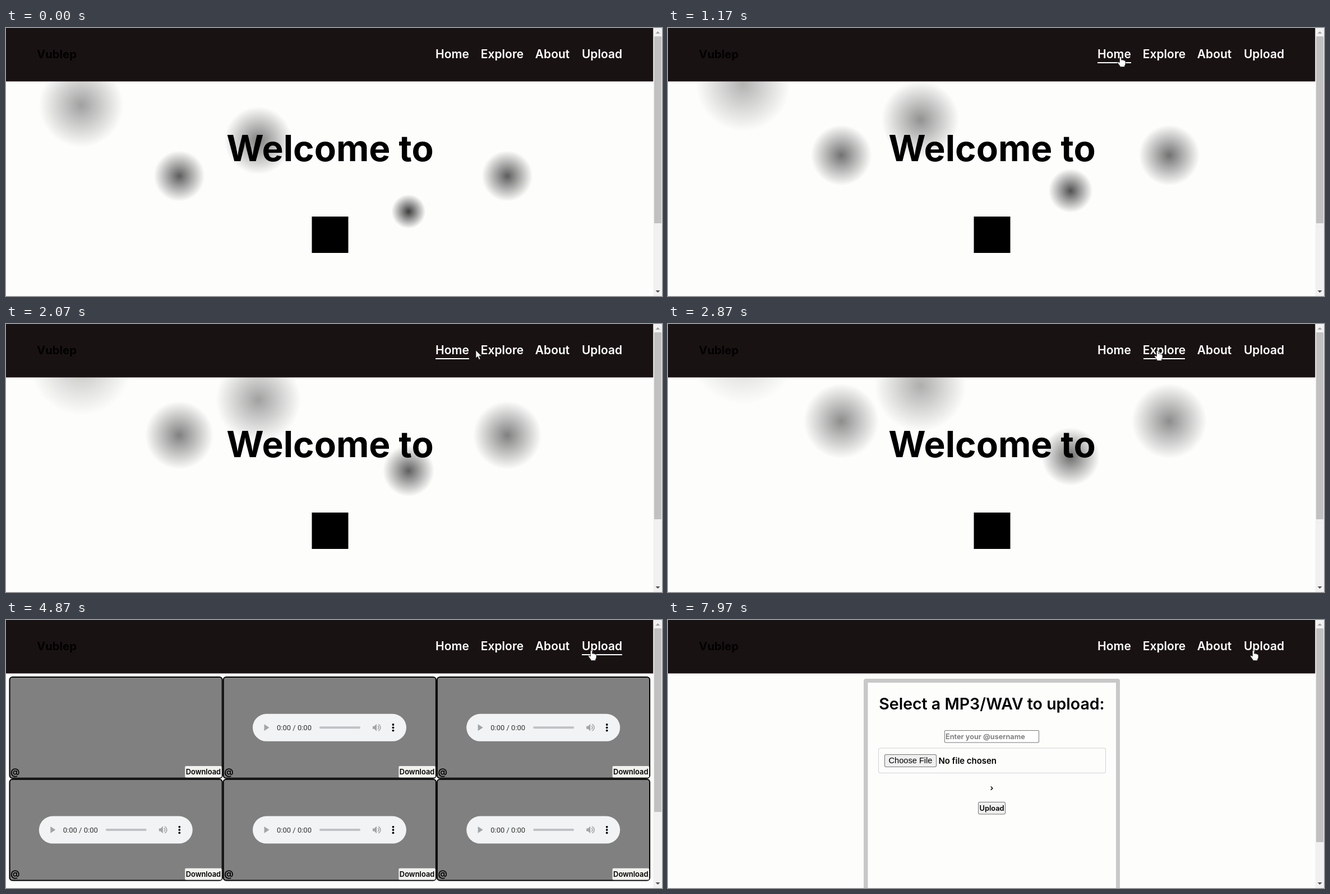
These frames come from a looping animation (1170x479 px, 8 s). An HTML page with a canvas:

```html
<!DOCTYPE html>
<html lang="en">
<head>
<meta charset="utf-8">
<title>Audio sharing site</title>
<style>
  html, body { margin: 0; width: 100%; height: 100%; overflow: hidden; background: #fdfdfc; }
  canvas { display: block; }
</style>
</head>
<body>
<canvas id="stage" width="1170" height="479"></canvas>
<script>
const ctx = document.getElementById('stage').getContext('2d');
const LOOP = 8000, EXPLORE_AT = 3100, UPLOAD_AT = 6720;
const PAPER = '#fdfdfc', SANS = 'Inter, "Open Sans", sans-serif';

// label, left, right
const NAV = [['Home', 766, 826], ['Explore', 848, 922], ['About', 944, 1005], ['Upload', 1027, 1099]];

// x, head start in seconds
const BLOBS = [[134, 6], [450, 4], [309, 2], [894, 2], [718, 0]];

// time, x, y of the pointer tip
const PATH = [
  [700, 1162, -20], [860, 1148, 4], [1150, 807, 51], [1750, 808, 51],
  [2070, 838, 47], [2600, 871, 48], [2870, 873, 47], [3400, 873, 47],
  [3730, 969, 95], [4180, 1094, 424], [4850, 1044, 54], [8000, 1044, 54]
];

// start, end of hand pointer, end of underline, nav item
const HOVERS = [[1060, 2000, 2190, 0], [2190, 3400, EXPLORE_AT, 1], [4780, LOOP, UPLOAD_AT, 3]];

function rect(x, y, w, h, fill, r = 0) {
  ctx.fillStyle = fill;
  ctx.beginPath();
  ctx.roundRect(x, y, w, h, r);
  ctx.fill();
}

function frame(x, y, w, h, fill, line, r) {
  rect(x, y, w, h, line, r);
  rect(x + 1, y + 1, w - 2, h - 2, fill, Math.max(0, r - 1));
}

function text(str, x, y, size, weight, color = '#000', align = 'left', family = SANS) {
  ctx.font = `${weight} ${size}px ${family}`;
  ctx.fillStyle = color;
  ctx.textAlign = align;
  ctx.fillText(str, x, y);
}

function poly(points, fill) {
  ctx.fillStyle = fill;
  ctx.beginPath();
  points.forEach(([x, y]) => ctx.lineTo(x, y));
  ctx.closePath();
  ctx.fill();
}

function dot(x, y, r, fill) {
  ctx.fillStyle = fill;
  ctx.beginPath();
  ctx.arc(x, y, r, 0, Math.PI * 2);
  ctx.fill();
}

// Every blob rises, grows and fades by the same rule
function blob(x, age) {
  const y = 328 - 31.7 * age, r = 30.5 + 7.5 * age, alpha = .76 - .065 * age;
  const g = ctx.createRadialGradient(x, y, 0, x, y, r);
  g.addColorStop(0, `rgba(0,0,0,${alpha})`);
  g.addColorStop(1, 'rgba(0,0,0,0)');
  dot(x, y, r, g);
}

function home(t) {
  BLOBS.forEach(([x, lead]) => blob(x, lead + t / 1000));
  text('Welcome to', 578, 238, 64, 700, '#000', 'center');
  rect(545.5, 337, 65, 65, '#000');
}

function player(x, y) {
  const gray = '#a3a4a5', mid = y + 24.5;
  rect(x, y, 274, 49, '#f1f3f4', 24.5);
  poly([[x + 20.5, mid - 6], [x + 29.5, mid], [x + 20.5, mid + 6]], gray);
  text('0:00 / 0:00', x + 43, y + 29, 13, 400, '#333', 'left', 'Roboto, sans-serif');
  rect(x + 119, mid - 2, 73, 4, '#c0c1c5', 2);
  const sx = x + 214;
  poly([[sx, mid - 2.5], [sx + 3, mid - 2.5], [sx + 7, mid - 6.5],
        [sx + 7, mid + 6.5], [sx + 3, mid + 2.5], [sx, mid + 2.5]], gray);
  ctx.strokeStyle = gray;
  ctx.lineWidth = 1.6;
  [3, 6.2].forEach(r => {
    ctx.beginPath();
    ctx.arc(sx + 7.8, mid, r, -1.2, 1.2);
    ctx.stroke();
  });
  [-5.3, 0, 5.3].forEach(d => dot(x + 250.5, mid + d, 1.9, '#000'));
}

function explore() {
  const w = 381.2, h = 182.8;
  for (let i = 0; i < 6; i++) {
    const x = 5.5 + w * (i % 3), y = 101 + h * Math.floor(i / 3);
    rect(x, y, w, h, '#000', 6);
    rect(x + 2, y + 2, w - 4, h - 4, '#808080', 4);
    if (i) player(x + 53.3, y + 66.8);
    text('@', x + 2.5, y + 175.5, 16.5, 600);
    rect(x + w - 67.5, y + 160, 65.5, 20.6, '#f1f1ee', 2);
    text('Download', x + w - 34.8, y + 174.8, 12.9, 600, '#000', 'center');
  }
}

function upload() {
  rect(349, 105, 457, 400, '#c8c8c8', 4);
  rect(356.5, 112, 442.5, 400, PAPER);
  text('Select a MP3/WAV to upload:', 577.5, 160, 28.5, 600, '#000', 'center');
  frame(493, 197, 169, 22.5, '#fff', '#767676', 2);
  text('Enter your @username', 495, 213, 12.8, 600, '#757575');
  frame(375, 228.5, 406, 45.5, PAPER, '#d2d2d6', 4);
  frame(386, 240, 93, 23, '#efefef', '#767676', 3);
  text('Choose File', 432.5, 256, 14.6, 400, '#000', 'center', '"Liberation Sans", Arial, sans-serif');
  text('No file chosen', 482.5, 256.5, 14.9, 600);
  text('›', 577.5, 304.5, 14, 600, '#000', 'center');
  frame(553, 325, 49, 22.5, '#efefef', '#767676', 3);
  text('Upload', 577.5, 341, 12.8, 600, '#000', 'center');
}

function header(t) {
  rect(0, 0, 1154.5, 95.5, '#191212');
  text('Vublep', 55, 54, 20.3, 700);
  NAV.forEach(([label, left, right]) => text(label, (left + right) / 2, 54, 21, 600, '#fff', 'center'));
  const hover = HOVERS.find(([from, , to]) => t >= from && t < to);
  if (hover) {
    const [, left, right] = NAV[hover[3]];
    rect(left, 61, right - left, 2, '#fff');
  }
}

function scrollbar(end) {
  rect(1154.5, 0, 15.5, 479, '#f1f1f1');
  rect(1156, 15, 13, end - 15, '#c1c1c1');
  poly([[1158.5, 10], [1162.5, 6], [1166.5, 10]], '#a3a3a3');
  poly([[1158.5, 469], [1162.5, 473], [1166.5, 469]], '#505050');
}

const ARROW = new Path2D('M0 0V14L3.3 11L5.6 16.5L8 15.5L5.7 10.2H10Z');
const HAND = new Path2D('M-1.6 1.2Q0 -1 1.6 1.2V6.2Q3.2 5 4.5 6.6Q6 5.8 6.8 7.3Q8.8 6.8 9 9V13' +
  'Q8.8 15 7.4 16.4V18.5H-.8V17Q-3.5 14 -5.3 10.8Q-5 8.6 -2.6 10L-1.6 11Z');

function pointer(t) {
  const i = PATH.findIndex(p => p[0] > t);
  if (i < 1) return;
  const [t0, x0, y0] = PATH[i - 1], [t1, x1, y1] = PATH[i];
  const u = (t - t0) / (t1 - t0), e = u * u * (3 - 2 * u);
  const hand = HOVERS.some(([from, to]) => t >= from && t < to);
  ctx.save();
  ctx.translate(x0 + (x1 - x0) * e, y0 + (y1 - y0) * e);
  ctx.fillStyle = '#fff';
  ctx.strokeStyle = '#222';
  ctx.lineWidth = .8;
  const shape = hand ? HAND : ARROW;
  ctx.fill(shape);
  ctx.stroke(shape);
  ctx.restore();
}

function draw(now) {
  const t = now % LOOP;
  rect(0, 0, 1170, 479, PAPER);
  if (t < EXPLORE_AT) home(t);
  else if (t < UPLOAD_AT) explore();
  else upload();
  header(t);
  scrollbar(t < EXPLORE_AT ? 349 : t < UPLOAD_AT ? 343 : 397);
  pointer(t);
}

const start = performance.now();
function tick() {
  draw(performance.now() - start);
  requestAnimationFrame(tick);
}
tick();
</script>
</body>
</html>
```
